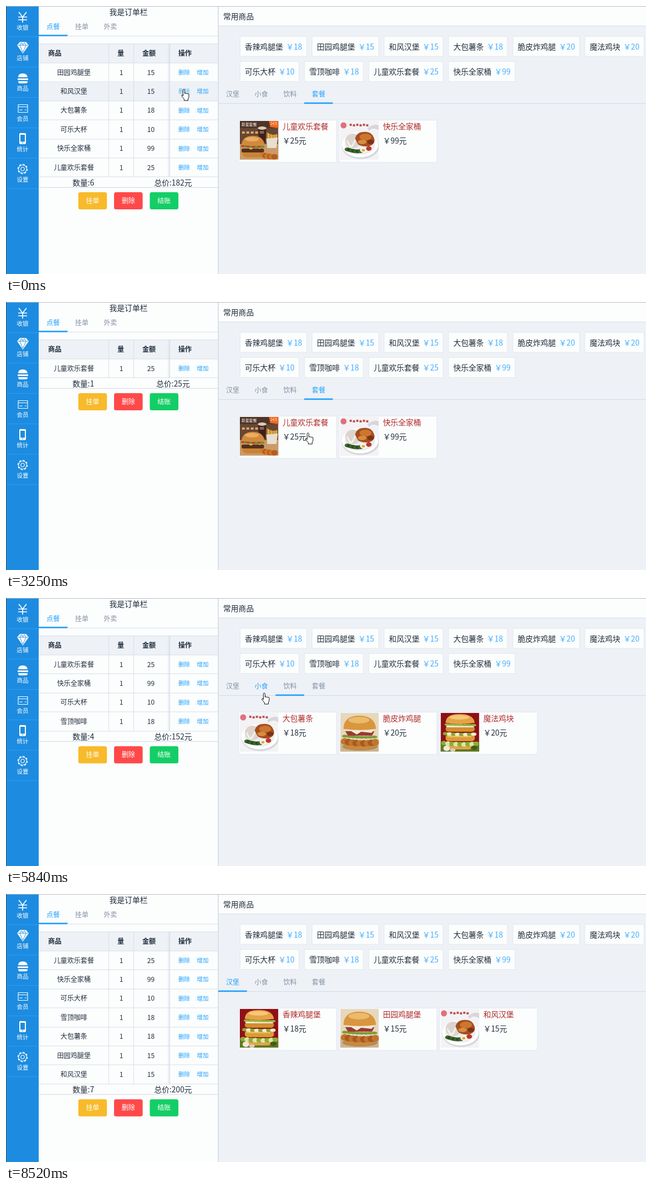
Recreate the animation shown at these times as an HTML page. Size 1155x485 px, loop 9.13 s.

```html
<!DOCTYPE html>
<html lang="zh-CN">
<head>
<meta charset="utf-8">
<title>订单</title>
<style>
html, body { margin: 0; width: 100%; height: 100%; overflow: hidden; background: #eef1f6; }
svg { display: block; font-family: "Noto Sans CJK SC", "Noto Sans CJK", "Noto Sans", sans-serif; }
#stage { width: 100%; height: 100%; }
text { white-space: pre; }
</style>
</head>
<body>
<svg id="stage" viewBox="0 0 1155 485"><g id="fixed"></g><g id="live"></g></svg>
<script>
const LOOP = 9130, BIG = 13.8, MID = 12.1, SMALL = 10.5;
const BLUE = '#20a0ff', INK = '#1f2d3d', GREY = '#8391a5', LINE = '#d8e0ea', WHITE = '#fcfdfd', PALE = '#eef1f6';

const price = {
  香辣鸡腿堡: 18, 田园鸡腿堡: 15, 和风汉堡: 15, 大包薯条: 18, 脆皮炸鸡腿: 20, 魔法鸡块: 20,
  可乐大杯: 10, 雪顶咖啡: 18, 儿童欢乐套餐: 25, 快乐全家桶: 99
};
const tabs = [
  { label: '汉堡', goods: [['香辣鸡腿堡', 'tower'], ['田园鸡腿堡', 'burger'], ['和风汉堡', 'plate']] },
  { label: '小食', goods: [['大包薯条', 'plate'], ['脆皮炸鸡腿', 'burger'], ['魔法鸡块', 'tower']] },
  { label: '饮料', goods: [['可乐大杯', 'plate'], ['雪顶咖啡', 'meal']] },
  { label: '套餐', goods: [['儿童欢乐套餐', 'meal'], ['快乐全家桶', 'plate']] }
];

// The screen refreshes in bursts: [first, last, count]
const bursts = [[0, 0, 1], [120, 1070, 8], [1220, 1760, 5], [2040, 2040, 1], [2340, 2970, 6], [3250, 3660, 4],
  [3940, 4220, 3], [4490, 5430, 8], [5580, 5840, 3], [5990, 6530, 5], [6830, 7420, 5], [7570, 7820, 3], [7960, 8520, 5]];
const refreshes = bursts.flatMap(([a, b, n]) =>
  Array.from({ length: n }, (_, i) => n > 1 ? a + (b - a) * i / (n - 1) : a));

// Pointer tip: [time, x, y]
const pointer = [[0, 321, 151], [250, 321, 152], [660, 321, 186], [800, 321, 187], [1220, 228, 295], [1490, 227, 297],
  [1760, 215, 290], [2340, 225, 288], [2970, 543, 229], [3250, 545, 237], [3660, 667, 237], [3940, 609, 206],
  [4220, 535, 178], [4490, 513, 163], [4630, 513, 163], [4900, 470, 232], [5030, 470, 232], [5300, 650, 235],
  [5580, 610, 228], [5840, 466, 172], [5990, 466, 172], [6260, 470, 228], [6530, 468, 230], [6830, 418, 172],
  [6980, 412, 166], [7120, 430, 172], [7420, 660, 231], [7570, 660, 231], [7820, 790, 238], [7960, 842, 237],
  [8100, 850, 245], [8380, 1058, 440], [8520, 1060, 500]];

// Order changes: [time, '+' or '-' or 'clear', product]
const startOrder = ['田园鸡腿堡', '和风汉堡', '大包薯条', '可乐大杯', '快乐全家桶', '儿童欢乐套餐'];
const orderLog = [[250, '-', '和风汉堡'], [790, '-', '可乐大杯'], [2040, 'clear'], [3250, '+', '儿童欢乐套餐'],
  [3940, '+', '快乐全家桶'], [4890, '+', '可乐大杯'], [5290, '+', '雪顶咖啡'], [6390, '+', '大包薯条'],
  [7690, '+', '田园鸡腿堡'], [7960, '+', '和风汉堡']];
const tabLog = [[-1000, 3], [4490, 2], [5840, 1], [6970, 0]];

const rect = (x, y, w, h, fill, more = '') => `<rect x="${x}" y="${y}" width="${w}" height="${h}" fill="${fill}" ${more}/>`;
const text = (x, y, s, size, fill, more = '') =>
  `<text x="${x}" y="${y + size * 0.37}" font-size="${size}" fill="${fill}" ${more}>${s}</text>`;
const centred = (x, y, s, size, fill) => text(x, y, s, size, fill, 'text-anchor="middle"');
const path = (d, fill, stroke = 'none', width = 1) =>
  `<path d="${d}" fill="${fill}" stroke="${stroke}" stroke-width="${width}" stroke-linejoin="round"/>`;
const oval = (x, y, rx, ry, fill) => `<ellipse cx="${x}" cy="${y}" rx="${rx}" ry="${ry}" fill="${fill}"/>`;
const scatter = (n, draw) => Array.from({ length: n }, (_, i) => draw(i, Math.sin(i * 12.9) * 0.5 + 0.5)).join('');

const photos = {
  burger: rect(0, 0, 70, 70, '#e6d8bd') + rect(0, 50, 70, 20, '#cdb48b') + oval(36, 61, 32, 7, '#ad8c62')
    + path('M7 54H64Q62 66 48 66H23Q9 66 7 54Z', '#c98a3e')
    + scatter(9, (i, r) => oval(8 + i * 7, 48 + r * 7, 7, 6, i % 2 ? '#a85a20' : '#c2752c'))
    + scatter(8, (i, r) => oval(9 + i * 7.5, 40 + r * 4, 6, 2.5, '#7f9a3a'))
    + path('M9 33H62L58 41H14Z', '#9b3b31') + path('M8 29Q35 24 63 29L57 36L38 34L30 39L20 33Z', '#f1ead6')
    + path('M6 29C6 10 20 5 35 5S64 11 65 29Q36 33 6 29Z', '#d9963f') + oval(34, 13, 19, 6, '#ebba6a'),
  tower: rect(0, 0, 70, 70, '#8e1118') + rect(0, 52, 70, 18, '#5f7a22')
    + path('M10 55H61Q60 66 49 66H22Q11 66 10 55Z', '#e0a34c')
    + scatter(9, (i, r) => oval(6 + i * 7.3, 52 + r * 5, 5, 4, i % 2 ? '#dfe6a2' : '#8eae36'))
    + rect(9, 39, 53, 12, '#dc9a37', 'rx="5"') + rect(12, 40, 44, 4, '#efbd5c', 'rx="2"')
    + scatter(8, (i, r) => oval(9 + i * 7.3, 36 + r * 3, 5, 3, i % 2 ? '#eef0cb' : '#88a735'))
    + rect(9, 24, 53, 10, '#d48d2e', 'rx="5"') + rect(10, 21, 51, 5, '#f3eccb', 'rx="2"')
    + scatter(7, (i, r) => oval(12 + i * 8, 20 + r * 2, 5, 2, '#9ab44a'))
    + path('M9 18C10 5 20 2 35 2S60 6 62 18Q36 22 9 18Z', '#e5a345') + oval(34, 8, 18, 4, '#f4c878')
    + oval(11, 64, 6, 5, '#f1e7dc') + oval(22, 67, 5, 3, '#d9cbbb') + oval(61, 63, 6, 4, '#3f5f18'),
  plate: rect(0, 0, 70, 70, '#f3f2f4') + oval(6, 8, 5.5, 5.5, '#e0717c')
    + scatter(6, i => rect(17 + i * 6, 5 + i % 2, 4, 4, '#c1585a'))
    + path('M50 13Q61 4 70 8V17Q60 10 52 18Z', '#d8d5dd') + oval(37, 46, 34, 23, '#d5d7dd') + oval(36, 43, 33, 23, '#fff')
    + oval(36, 43, 27, 18, '#ececee') + oval(23, 36, 14, 13, '#dcd4cf') + scatter(16, (i, r) => oval(13 + i * 1.4, 28 + r * 18, 2, 1.2, '#faf7f2'))
    + path('M27 32Q30 20 42 20Q56 18 61 30Q66 41 52 46Q34 47 31 40Z', '#a44f20')
    + oval(46, 29, 11, 6, '#cd7631') + oval(40, 38, 8, 4, '#d78d3d') + oval(55, 38, 6, 4, '#7c3216')
    + scatter(7, (i, r) => oval(13 + i * 4, 48 + r * 7, 5, 3.5, i % 2 ? '#294c20' : '#3f682c'))
    + oval(42, 53, 6, 4, '#fffaf0') + oval(42, 53, 3, 2.3, '#e6a52f') + oval(52, 50, 5, 4, '#c33327'),
  meal: rect(0, 0, 70, 70, '#674633') + rect(0, 42, 70, 28, '#c99b68') + rect(0, 0, 70, 13, '#4f3528')
    + text(3, 6, '新套套餐', 7, '#fff') + path('M53 0H70V13L55 11Z', '#f06a22') + text(56, 5, '24.5', 6, '#fff')
    + scatter(4, i => rect(4 + i * 8, 19, 5, 4, '#d6a76d'))
    + path('M33 13H48L46 39H35Z', '#3e211b') + oval(40.500, 13, 8, 3, '#d9c9b7') + rect(36, 18, 8, 5, '#86634e')
    + scatter(8, (i, r) => rect(49 + i * 2.4, 17 + r * 8, 2, 22, i % 2 ? '#f2c455' : '#dfa335'))
    + path('M48 32L69 30L66 49H50Z', '#e8dfd0')
    + path('M3 54H43Q42 66 33 66H14Q4 66 3 54Z', '#c98236')
    + rect(3, 50, 41, 7, '#55301c', 'rx="3"') + path('M4 45L44 45L36 51L29 47L20 52L12 47Z', '#f0b941')
    + scatter(8, (i, r) => oval(6 + i * 5, 44 + r * 3, 4, 2, i % 2 ? '#718e30' : '#b84432'))
    + path('M3 43C4 31 13 27 24 27S43 31 45 43Q25 47 3 43Z', '#d28a3c') + oval(22, 33, 13, 4, '#e9ad61')
    + scatter(6, (i, r) => oval(43 + i * 4, 59 + r * 6, 6, 5, i % 2 ? '#b65d20' : '#d07b2b'))
};

function chips() {
  let x = 422, y = 55;
  return Object.entries(price).map(([name, cost], i) => {
    if (i === 6) { x = 422; y = 100.500; }
    const w = 52 + name.length * BIG, left = x;
    x += w + 9;
    return rect(left + 0.5, y, w - 1, 36, WHITE, 'stroke="#e3e9f1"') + text(left + 9, y + 18.5, name, BIG, INK)
      + text(left + w - 8.5, y + 18.5, '￥' + cost, BIG, '#44adff', 'text-anchor="end"');
  }).join('');
}

function sidebar() {
  const labels = ['收银', '店铺', '商品', '会员', '统计', '设置'];
  const stroked = (d, w) => path(d, 'none', '#fff', w);
  return rect(0, 0, 59, 485, '#1d8ce0')
    + labels.map((s, i) => centred(30, 39 + i * 55, s, SMALL, '#fff') + rect(0, 55 + i * 55, 59, 1, '#20a0ff')).join('')
    + stroked('M23 11L30 20L37 11M30 20V30M22 20H38M22 25H38', 1.7)
    + path('M25 65H36L41 71L30.500 86L20 71Z', '#fff')
    + path('M21 71H40M25 71L30.500 84L36 71L33 66L30.500 71L28 66L25 71', 'none', '#1d8ce0', 0.9)
    + path('M22 129Q22 122 30 122T39 129ZM21 131H40V134H21ZM22 136H39Q39 140 36 140H25Q22 140 22 136Z', '#fff')
    + stroked('M22 178.500H39V192.500H22ZM22 182.500H39M24 188H30M34 188H37', 1.1)
    + rect(24, 230, 12, 20, '#fff', 'rx="2"') + rect(26, 233, 8, 12.5, '#1d8ce0') + oval(30, 247.5, 1, 1, '#1d8ce0')
    + '<circle cx="30" cy="295" r="7.3" fill="none" stroke="#fff" stroke-width="1.1"/>'
    + '<circle cx="30" cy="295" r="8.5" fill="none" stroke="#fff" stroke-width="1.6" stroke-dasharray="3.3 3.375"/>'
    + '<circle cx="30" cy="295" r="3.2" fill="none" stroke="#fff" stroke-width="1.1"/>';
}

function fixedParts() {
  const heads = [[76, '商品'], [201, '量'], [246, '金额'], [311, '操作']];
  return rect(0, 0, 1155, 485, PALE) + sidebar()
    + rect(59, 0, 324, 485, WHITE) + rect(382.5, 0, 1, 485, '#c0ccda')
    + centred(221, 11, '我是订单栏', BIG, INK)
    + ['点餐', '挂单', '外卖'].map((s, i) => text(73 + i * 51.6, 38, s, MID, i ? GREY : BLUE)).join('')
    + rect(59, 54, 323, 1, LINE) + rect(59, 52, 52, 2.6, BLUE)
    + rect(59, 68, 323, 35, PALE) + rect(59, 68, 323, 1, LINE)
    + [185, 230].map(x => rect(x, 68, 1, 35, LINE)).join('')
    + heads.map(([x, s]) => text(x, 85.5, s, MID, INK, 'font-weight="bold"')).join('')
    + rect(384, 0, 771, 36, WHITE) + rect(384, 35.5, 771, 1, LINE) + text(392, 19, '常用商品', BIG, INK)
    + chips() + rect(384, 176, 771, 1, '#d1dbe5')
    + rect(0, 0, 1155, 1, '#b5bac2') + rect(0, 0, 1, 485, '#34506b');
}

function orderAt(t) {
  let order = startOrder;
  for (const [when, action, name] of orderLog) {
    if (when > t) break;
    order = action === '+' ? [...order, name] : action === '-' ? order.filter(n => n !== name) : [];
  }
  return order;
}

function pointerAt(t) {
  const i = pointer.findIndex(k => k[0] > t);
  if (i < 0) return pointer.at(-1).slice(1);
  const [t0, x0, y0] = pointer[i - 1], [t1, x1, y1] = pointer[i], p = (t - t0) / (t1 - t0);
  return [x0 + (x1 - x0) * p, y0 + (y1 - y0) * p];
}

function orderPanel(t, [px, py]) {
  const order = orderAt(t), rowHeight = 34.4, end = 103 + (order.length ? order.length * rowHeight : 51.6);
  const focusedRow = t < 700 ? 1 : t < 1350 ? 2 : -1;
  let out = order.map((name, i) => {
    const y = 103 + i * rowHeight, mid = y + 17.2;
    const hovered = px < 382 && py > y && py < y + rowHeight;
    return (hovered ? rect(59, y, 323, rowHeight, PALE) : '')
      + centred(122.5, mid, name, MID, INK) + centred(208, mid, 1, MID, INK) + centred(261.5, mid, price[name], MID, INK)
      + text(311, mid, '删除', SMALL, i === focusedRow ? '#4db3ff' : BLUE) + text(344.5, mid, '增加', SMALL, BLUE)
      + rect(59, Math.round(y + rowHeight) - 0.5, 323, 1, LINE);
  }).join('');
  if (order.length) out += [185, 230].map(x => rect(x, 103, 1, end - 103, LINE)).join('');
  else out += centred(221.5, 129.5, '暂无数据', MID, '#5e7382') + rect(59, end - 0.5, 323, 1, LINE);
  out += rect(59, 102.5, 323, 1, LINE) + rect(292, 69, 4, end - 69, '#d3dce6', 'opacity=".4"') + rect(295, 69, 1, end - 69, '#d3dae4');

  const total = order.reduce((sum, name) => sum + price[name], 0);
  out += centred(139.5, end + 10, '数量:' + order.length, BIG, INK) + centred(301.5, end + 10, `总价:${total}元`, BIG, INK)
    + rect(59, end + 18.5, 323, 1, '#cfd9e5');
  const red = t >= 1200 && t < 3250 ? '#ff6d6d' : '#ff4949';
  return out + [['挂单', '#f7ba2a'], ['删除', red], ['结账', '#13ce66']].map(([s, fill], i) =>
    rect(130.5 + i * 64.5, end + 27.7, 51.6, 31, fill, 'rx="3.5"') + centred(156.3 + i * 64.5, end + 43, s, MID, '#fff')).join('');
}

function goodsPanel(t, active, previous, since) {
  const p = Math.min(1, (t - since) / 300), eased = p * p * (3 - 2 * p);
  const bar = previous + (active - previous) * eased;
  return tabs.map((tab, i) => text(397 + i * 51.7, 160, tab.label, MID, i === active ? BLUE : GREY)).join('')
    + rect(383 + bar * 51.7, 174.5, 51.7, 2.6, BLUE)
    + tabs[active].goods.map(([name, photo], i) => {
      const x = 420 + i * 181.2;
      return rect(x, 206.5, 176.5, 76.5, WHITE, 'stroke="#e3e9f1"')
        + `<svg x="${x + 2}" y="208" width="69.5" height="70" viewBox="0 0 70 70" preserveAspectRatio="none">${photos[photo]}</svg>`
        + text(x + 79, 218, name, BIG, '#b02a2a') + text(x + 79, 244, `￥${price[name]}元`, BIG, INK);
    }).join('');
}

function cursor(t, [x, y], cardCount) {
  const overCard = y > 205 && y < 283 && x > 420 && x < 420 + cardCount * 181;
  const hand = x < 383 ? t < 2040 : y < 177 || overCard;
  const shape = hand
    ? 'M-1.500 12V1.500a1.500 1.500 0 0 1 3 0V7.500a1.400 1.300 0 0 1 2.700.3a1.300 1.200 0 0 1 2.500.5a1.200 1.200 0 0 1 2.300.6V14L7.500 17V20H.5V17.500L-4.300 11.500a1.400 1.400 0 0 1 2-1.500Z'
    : 'M0 0V13.500L3.200 10.600L5.500 16L7.700 15L5.400 9.800H9.700Z';
  return `<g transform="translate(${x} ${y})">${path(shape, '#fff', '#111', 1)}</g>`;
}

const live = document.getElementById('live');
document.getElementById('fixed').innerHTML = fixedParts();

let shown = -1;
function frame() {
  const now = performance.now() % LOOP;
  const t = refreshes.findLast(r => r <= now);
  if (t !== shown) {
    const step = tabLog.findLastIndex(([when]) => when <= t), [since, active] = tabLog[step];
    const previous = tabLog[Math.max(0, step - 1)][1], tip = pointerAt(t);
    live.innerHTML = orderPanel(t, tip) + goodsPanel(t, active, previous, since) + cursor(t, tip, tabs[active].goods.length);
    shown = t;
  }
  requestAnimationFrame(frame);
}
frame();
</script>
</body>
</html>
```
